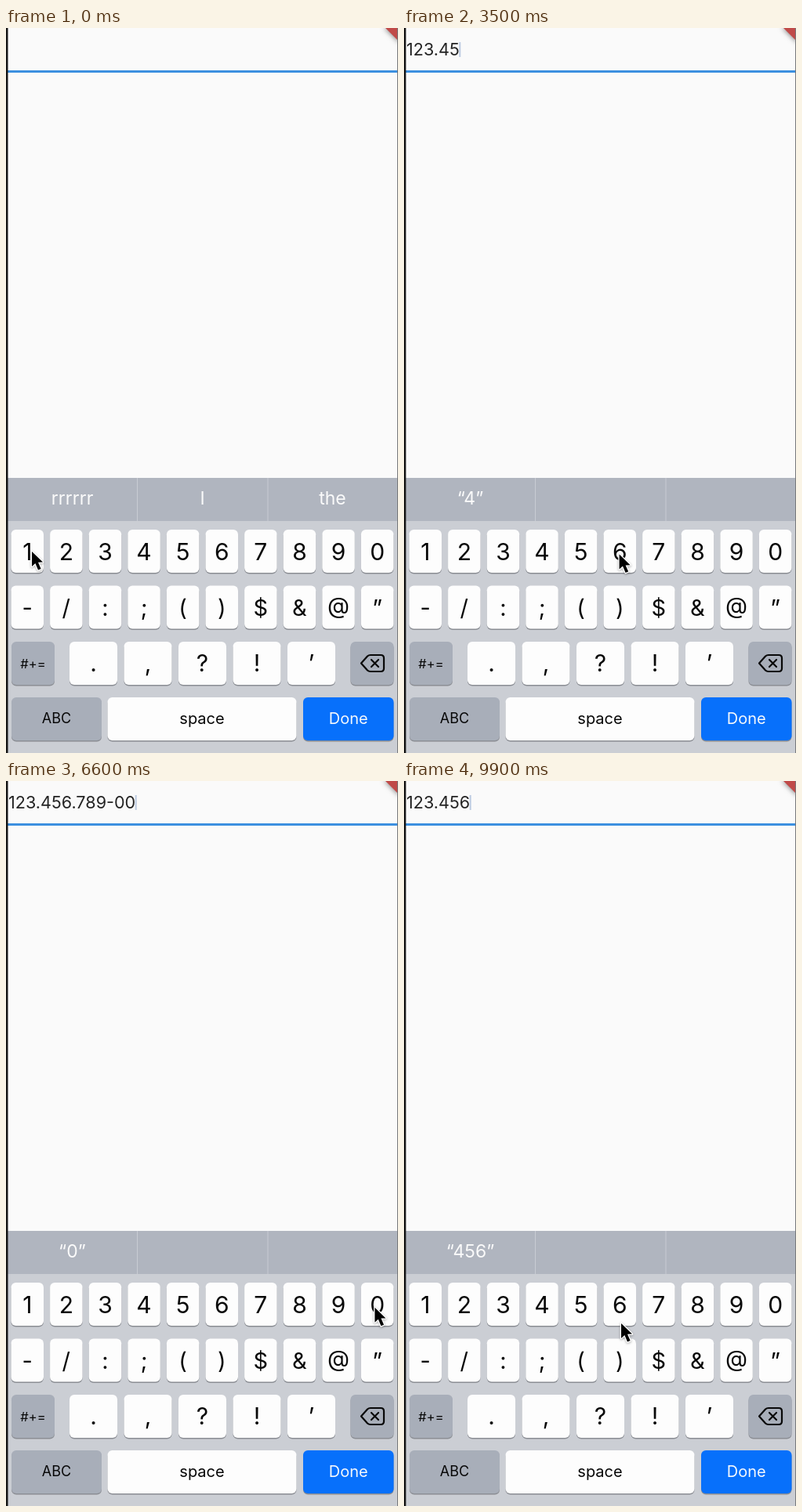
An HTML page with a canvas for the animation above (10 s loop, 500 by 925 pixels).

```html
<!DOCTYPE html>
<html lang="en">
<head>
<meta charset="utf-8">
<title>Masked number field</title>
<style>
html, body { margin: 0; width: 100%; height: 100%; overflow: hidden; background: #fafafa; }
canvas { display: block; }
</style>
</head>
<body>
<canvas id="stage" width="500" height="925"></canvas>
<script>
const ctx = document.getElementById('stage').getContext('2d');
const LOOP = 10000, STEP = 100, KEYS = '1234567890';
const INK = '#080808', WHITE = '#fdfdfd', GREY = '#a8aeb9', PAGE = '#fafafa';

// [time, key]; '<' is the delete key
const presses = [
  [1100, '1'], [1500, '2'], [2100, '3'], [2500, '4'], [3100, '5'], [3600, '6'],
  [4300, '7'], [4700, '8'], [5100, '9'], [5700, '0'], [6200, '0'],
  [7300, '<'], [7800, '<'], [8200, '<'], [8600, '<'], [9000, '<']
];

// [time, x, y] of the pointer tip
const pointerPath = [
  [0, 33, 668], [1150, 33, 668], [1450, 76, 670], [1650, 77, 670], [2050, 130, 668],
  [2500, 187, 667], [2700, 187, 667], [3100, 228, 668], [3600, 280, 672], [3800, 281, 672],
  [4300, 349, 675], [4450, 349, 675], [4750, 379, 671], [5100, 425, 667], [5500, 470, 664],
  [6500, 470, 664], [7200, 477, 805], [9200, 477, 805], [9900, 277, 692]
];

function pointerAt(t) {
  const i = pointerPath.findIndex(p => p[0] > t);
  if (i < 0) return pointerPath.at(-1).slice(1);
  const [t0, x0, y0] = pointerPath[i - 1], [t1, x1, y1] = pointerPath[i];
  const k = (t - t0) / (t1 - t0), e = k * k * (3 - 2 * k);
  return [x0 + (x1 - x0) * e, y0 + (y1 - y0) * e];
}

function valueAt(t) {
  let digits = '';
  for (const [at, key] of presses) {
    if (at + STEP > t) break;
    digits = key === '<' ? digits.slice(0, -1) : digits + key;
  }
  return [...digits].map((d, i) => (i === 9 ? '-' : i && i % 3 === 0 ? '.' : '') + d).join('');
}

function box(x, y, w, h, r, color) {
  ctx.fillStyle = color;
  ctx.beginPath();
  ctx.roundRect(x, y, w, h, r);
  ctx.fill();
}

function label(text, x, y, size, color = INK, align = 'center', weight = 400) {
  ctx.font = `${weight} ${size}px Inter, sans-serif`;
  ctx.textAlign = align;
  ctx.fillStyle = color;
  ctx.fillText(text, x, y);
}

function key(text, x, y, w, size, baseline, fill = WHITE, color = INK) {
  box(x, y + 1.5, w, 55, 6, '#8b8e94');
  box(x, y, w, 55, 6, fill);
  label(text, x + w / 2, y + baseline, size, color);
}

function shadow(color, blur, dy) {
  ctx.shadowColor = color;
  ctx.shadowBlur = blur;
  ctx.shadowOffsetY = dy;
}

function deleteIcon(pressed) {
  ctx.beginPath();
  ctx.moveTo(453, 810.5);
  ctx.lineTo(461, 801.5);
  ctx.quadraticCurveTo(462.5, 800, 465, 800);
  ctx.lineTo(478, 800);
  ctx.quadraticCurveTo(482, 800, 482, 804);
  ctx.lineTo(482, 817);
  ctx.quadraticCurveTo(482, 821, 478, 821);
  ctx.lineTo(465, 821);
  ctx.quadraticCurveTo(462.5, 821, 461, 819.5);
  ctx.closePath();
  ctx.lineWidth = 2.2;
  ctx.lineJoin = ctx.lineCap = 'round';
  ctx.strokeStyle = ctx.fillStyle = INK;
  if (pressed) ctx.fill();
  ctx.stroke();
  ctx.strokeStyle = pressed ? WHITE : INK;
  ctx.beginPath();
  ctx.moveTo(466, 806);
  ctx.lineTo(475, 815);
  ctx.moveTo(475, 806);
  ctx.lineTo(466, 815);
  ctx.stroke();
}

function popup(digit) {
  const c = 27 + 49.6 * KEYS.indexOf(digit);
  ctx.save();
  shadow('rgba(60,64,72,.4)', 7, 2);
  ctx.fillStyle = WHITE;
  ctx.beginPath();
  ctx.moveTo(c, 553);
  ctx.arcTo(c + 37.5, 553, c + 37.5, 580, 11);
  ctx.lineTo(c + 37.5, 616);
  ctx.bezierCurveTo(c + 37.5, 634, c + 21, 632, c + 21, 650);
  ctx.arcTo(c + 21, 695, c, 695, 6);
  ctx.arcTo(c - 21, 695, c - 21, 650, 6);
  ctx.lineTo(c - 21, 650);
  ctx.bezierCurveTo(c - 21, 632, c - 37.5, 634, c - 37.5, 616);
  ctx.arcTo(c - 37.5, 553, c, 553, 11);
  ctx.fill();
  ctx.restore();
  label(digit, c, 610, 52, INK, 'center', 300);
}

function pointer(x, y) {
  ctx.save();
  ctx.translate(x, y);
  ctx.beginPath();
  [[0, 0], [0, 19], [4.4, 15], [8, 23.5], [11.6, 22], [8, 13.8], [14, 13.6]]
    .forEach(p => ctx.lineTo(...p));
  ctx.closePath();
  ctx.lineJoin = 'round';
  ctx.lineWidth = 2.6;
  ctx.strokeStyle = '#fff';
  shadow('rgba(50,50,50,.4)', 3, 1);
  ctx.stroke();
  shadow('transparent', 0, 0);
  ctx.fillStyle = '#000';
  ctx.fill();
  ctx.restore();
}

function field(t) {
  const value = valueAt(t);
  label(value, 3, 35, 21.6, '#242424', 'left');
  const changed = presses.reduce((last, [at]) => at + STEP <= t ? at + STEP : last, 0);
  const phase = (t - changed) % 1000;
  if (value && phase >= 300 && phase < 850) {
    box(2.5 + ctx.measureText(value).width, 18, 2, 19, 0, '#bccbe2');
  }
  box(0, 54, 500, 3, 0, '#3c90e0');

  ctx.save();
  shadow('rgba(50,50,50,.6)', 6, 1);
  ctx.fillStyle = '#c04a48';
  ctx.beginPath();
  ctx.moveTo(482, -2);
  ctx.lineTo(502, 18);
  ctx.lineTo(502, -2);
  ctx.fill();
  ctx.restore();
}

function suggestions(t) {
  box(0, 574, 500, 55, 0, '#b0b5bf');
  box(167, 574, 1, 55, 0, '#c8ccd3');
  box(333.5, 574, 1, 55, 0, '#c8ccd3');
  const word = valueAt(t - 350).split(/[.-]/).pop();
  const words = word ? [`“${word}”`] : valueAt(t) ? [] : ['rrrrrr', 'I', 'the'];
  words.forEach((w, i) => label(w, 84.5 + 166 * i, 608, 23, PAGE));
}

function keyboard(pressed) {
  box(0, 574, 500, 351, 0, '#cbced4');
  [...KEYS].forEach((k, i) => key(k, 6.5 + 49.6 * i, 640, 41.5, 30, 39));
  // The at sign sits raised, level with the digits
  [...'-/:;()$&@”'].forEach((k, i) => key(k, 6.5 + 49.6 * i, 711.5, 41.5, 29, k === '@' ? 35 : 38));
  [...'.,?!’'].forEach((k, i) => key(k, 81 + 69.5 * i, 783, 61, 30, 38));
  key('#+=', 7, 783, 55, 16.5, 34, GREY);
  key('', 439.5, 783, 55, 16, 34, pressed === '<' ? WHITE : GREY);
  deleteIcon(pressed === '<');
  key('ABC', 7, 854, 115, 18, 33, GREY);
  key('space', 129.5, 854, 241, 20, 34);
  key('Done', 379, 854, 115.5, 20, 34, '#0770fb', '#f4f8fc');
}

function draw(t) {
  const hit = presses.find(([at]) => t >= at && t < at + 250);
  const pressed = hit && hit[1];
  box(0, 0, 500, 925, 0, PAGE);
  field(t);
  keyboard(pressed);
  suggestions(t);
  box(0, 0, 2.5, 925, 0, '#161616');
  box(499, 0, 1, 925, 0, '#77787a');
  if (pressed && pressed !== '<') popup(pressed);
  pointer(...pointerAt(t));
}

const start = performance.now();
function frame() {
  const t = (performance.now() - start) % LOOP;
  draw(Math.floor(t / STEP) * STEP);
  requestAnimationFrame(frame);
}
frame();
</script>
</body>
</html>
```
